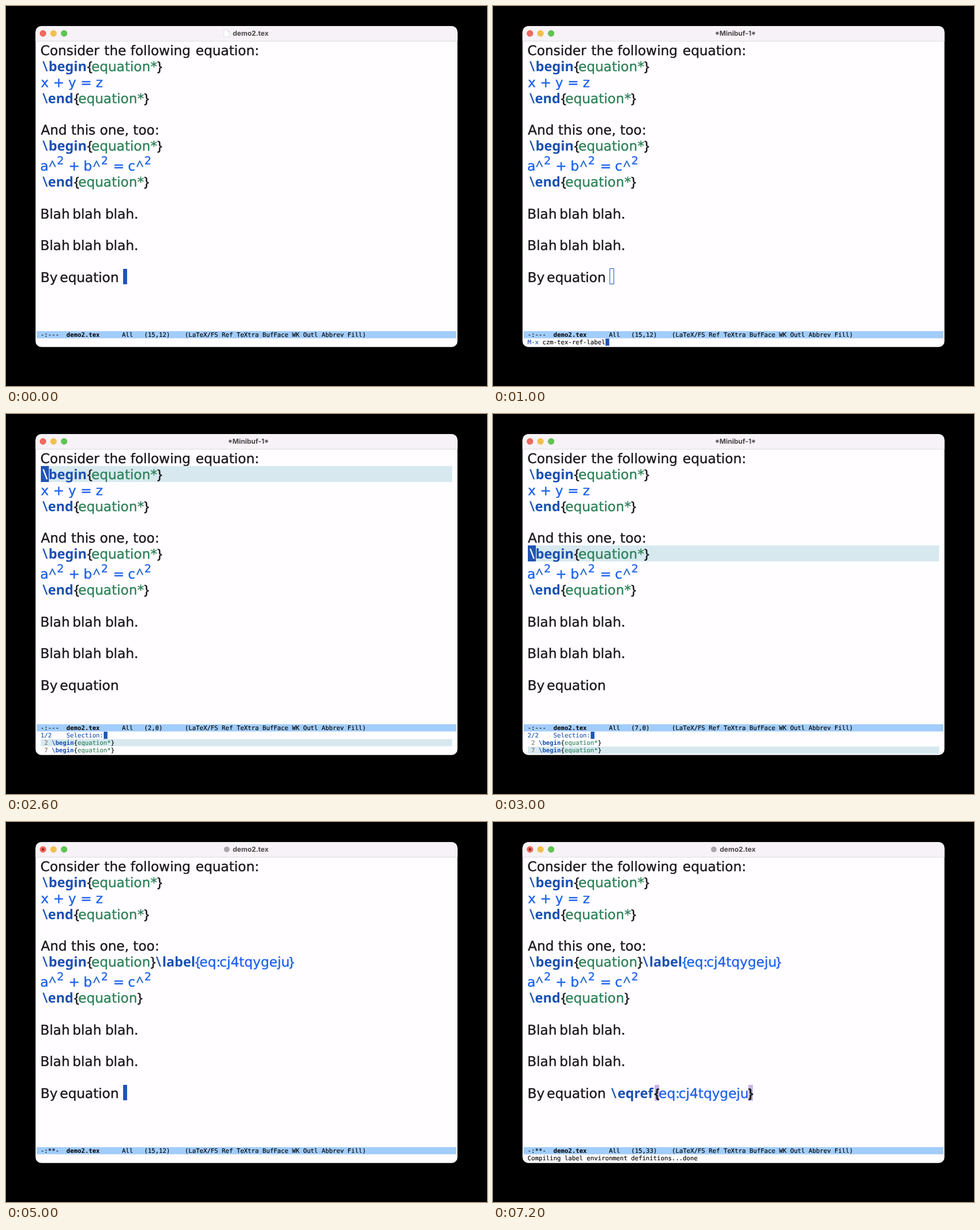
Animation of 842 by 665 pixels, one loop 8000 ms. Source, as an HTML page with a canvas:

```html
<!DOCTYPE html>
<html lang="en">
<head>
<meta charset="utf-8">
<title>demo2.tex</title>
<style>
html, body { margin: 0; width: 100%; height: 100%; overflow: hidden; background: #000; }
canvas { display: block; }
</style>
</head>
<body>
<canvas id="stage" width="842" height="665"></canvas>
<script>
const ctx = document.getElementById('stage').getContext('2d');

const INK = '#1c1a1c', NAVY = '#1a50b2', BLUE = '#1e62f0', GREEN = '#2f8259';
const CURSOR = '#2055b3', PAPER = '#fffdff', BAND = '#d7e9ef', MATCH = '#c8b5e8';
const SANS = '23.4px "DejaVu Sans", sans-serif';
const SUPER = '19px "DejaVu Sans", sans-serif';
const NARROW = '24px "Noto Sans", sans-serif';
const BOLD = 'bold 23.7px "Noto Sans", sans-serif';
const MONO = '10.757px "DejaVu Sans Mono", monospace';
const TITLE = 'bold 12px Inter, sans-serif';
const COL = 6.476;
const KEY = 'cj4tqygeju';

// One entry per second; the last one holds for two.
const states = [
  { point: '15,12', block: true },
  { point: '15,12', hollow: [204.5, 459.5], prompt: 'M-x ', input: 'czm-tex-ref-label' },
  { point: '2,0', pick: 0 },
  { point: '7,0', pick: 1 },
  { point: '7,16', hollow: [260.5, 230.5], prompt: 'Description:', input: KEY, numbered: true },
  { point: '15,12', block: true, numbered: true, labelled: true },
  { point: '15,33', numbered: true, labelled: true, cited: true }
];

const pageIcon = new Path2D('M381.5 42H388L391.5 45.5V54H381.5ZM388 42V45.5H391.5');

function rect(x, y, w, h, color) {
  ctx.fillStyle = color;
  ctx.fillRect(x, y, w, h);
}

function disc(x, y, r, color) {
  ctx.fillStyle = color;
  ctx.beginPath();
  ctx.arc(x, y, r, 0, 7);
  ctx.fill();
}

// Regular weights get a hairline outline to look as sturdy as desktop rendering.
function text(str, x, y, color = INK, font = SANS) {
  ctx.font = font;
  ctx.fillStyle = ctx.strokeStyle = color;
  ctx.fillText(str, x, y);
  if (font.startsWith('bold')) return;
  ctx.lineWidth = font === MONO ? 0.15 : 0.4;
  ctx.strokeText(str, x, y);
}

function mono(str, col, y, color = '#000', bold = false) {
  text(str, 60.5 + col * COL, y, color, (bold ? 'bold ' : '') + MONO);
}

function words(y, color, ...pairs) {
  for (let i = 0; i < pairs.length; i += 2) text(pairs[i + 1], pairs[i], y, color);
}

function macro(name, x, y, gap = 11, slash = NAVY) {
  text('\\', x, y, slash, NARROW);
  text(name, x + gap, y, NAVY, BOLD);
}

function environment(name, y, star, slash) {
  const x = name === 'begin' ? 142 : 119;
  macro(name, 64, y, name === 'begin' ? 10.5 : 9.5, slash);
  text('{', x, y, INK, NARROW);
  text('equation', x + 7.5, y, GREEN);
  if (star) text('*', x + 111, y, GREEN);
  text('}', x + (star ? 122.5 : 111), y, INK, NARROW);
}

function labelKey(x, y) {
  words(y, BLUE, x, 'eq:', x + 35, KEY);
}

function windowFrame(s) {
  ctx.fillStyle = PAPER;
  ctx.beginPath();
  ctx.roundRect(51.7, 35.3, 738.6, 561.4, 10);
  ctx.fill();
  ctx.save();
  ctx.clip();
  rect(51, 35, 740, 26, '#f7f2f7');
  rect(51, 61, 740, 1, '#e0dbe0');
  ctx.restore();
  ['#ec6a5e', '#f4bf4f', '#61c454'].forEach((c, i) => disc(64.7 + 18.5 * i, 48, 5.7, c));
  if (s.labelled) disc(64.7, 48, 2, '#7c1a12');

  if (s.prompt || s.pick >= 0) {
    text('*Minibuf-1*', 388.5, 52, '#484548', TITLE);
    return;
  }
  text('demo2.tex', 397, 52, '#484548', TITLE);
  if (s.labelled) {
    disc(386.5, 48, 5, '#aaa6aa');
  } else {
    ctx.fillStyle = '#fff';
    ctx.strokeStyle = '#d8d4d8';
    ctx.lineWidth = 0.7;
    ctx.fill(pageIcon);
    ctx.stroke(pageIcon);
  }
}

function buffer(s) {
  const picked = s.pick >= 0 ? [91, 230][s.pick] : null;
  if (picked) {
    rect(61, picked, 720, 28, BAND);
    rect(61, picked, 14, 28, CURSOR);
  }
  const star = !s.numbered;
  const slash = i => s.pick === i ? PAPER : NAVY;

  words(86, INK, 60.3, 'Consider', 172, 'the', 218, 'following', 332, 'equation:');
  environment('begin', 114, true, slash(0));
  words(142, BLUE, 61, 'x', 82.5, '+', 109, 'y', 130.5, '=', 157.3, 'z');
  environment('end', 169.5, true);

  text('And this one, too:', 61, 225);
  environment('begin', 253, star, slash(1));
  if (s.labelled) {
    macro('label', 262.5, 253);
    text('{', 331, 253, BLUE, NARROW);
    labelKey(338.8, 253);
    text('}', 495.5, 253, BLUE, NARROW);
  }
  words(288, BLUE, 60, 'a', 109.5, '+', 135.8, 'b', 187.5, '=', 213.5, 'c');
  for (const x of [74.5, 151.8, 227.5]) {
    text('^', x, 288, '#2a66c4', NARROW);
    text('2', x + 14.8, 277, BLUE, SUPER);
  }
  environment('end', 316, star);

  for (const y of [371.5, 427]) words(y, INK, 60, 'Blah', 116.5, 'blah', 173.7, 'blah.');
  words(483, INK, 60.5, 'By', 94.3, 'equation');

  if (s.cited) {
    rect(283, 460, 8, 28, MATCH);
    rect(447, 460, 8, 28, MATCH);
    macro('eqref', 207, 483);
    text('{', 282.3, 483, INK, BOLD);
    labelKey(290, 483);
    text('}', 446.3, 483, INK, BOLD);
  }
  if (s.block) rect(205, 460, 7, 27, CURSOR);
  if (s.hollow) {
    ctx.strokeStyle = CURSOR;
    ctx.lineWidth = 1;
    ctx.strokeRect(...s.hollow, 7, 27);
  }
}

function modeLine(s) {
  const top = s.pick >= 0 ? 543 : 569;
  const y = top + 9.7;
  rect(53.5, top, 735, 12.5, '#a2cdfb');
  mono(s.numbered ? '-:**-' : '-:---', 0, y);
  mono('demo2.tex', 7, y, '#000', true);
  mono('All', 22, y);
  mono(`(${s.point})`, 28, y);
  mono('(LaTeX/FS Ref TeXtra BufFace WK Outl Abbrev Fill)', 39, y);
}

function minibuffer(s) {
  if (s.prompt) {
    const end = s.prompt.length + s.input.length;
    mono(s.prompt, 0, 591.7, CURSOR);
    mono(s.input, s.prompt.length, 591.7);
    rect(61 + end * COL, 582, 6.5, 12.5, CURSOR);
  } else if (s.pick >= 0) {
    mono(`${s.pick + 1}/2`, 0, 565.7, CURSOR);
    mono('Selection:', 7, 565.7, CURSOR);
    rect(61 + 17 * COL, 556, 6.5, 12.5, CURSOR);
    rect(61, 569 + 13 * s.pick, 720, 12.5, BAND);
    [2, 7].forEach((line, i) => {
      const y = 578.7 + 13 * i;
      mono(line, 1, y, '#857673');
      mono('\\begin', 3, y, NAVY, true);
      mono('{', 9, y);
      mono('equation*', 10, y, GREEN);
      mono('}', 19, y);
    });
  } else if (s.cited) {
    mono('Compiling label environment definitions...done', 0, 591.7);
  }
}

const start = performance.now();

function frame() {
  const now = performance.now() - start;
  const s = states[Math.min(6, Math.floor(now % 8000 / 1000))];
  ctx.textRendering = 'geometricPrecision';
  ctx.lineJoin = 'round';
  rect(0, 0, 842, 665, '#000');
  windowFrame(s);
  buffer(s);
  modeLine(s);
  minibuffer(s);
  requestAnimationFrame(frame);
}
frame();
</script>
</body>
</html>
```
